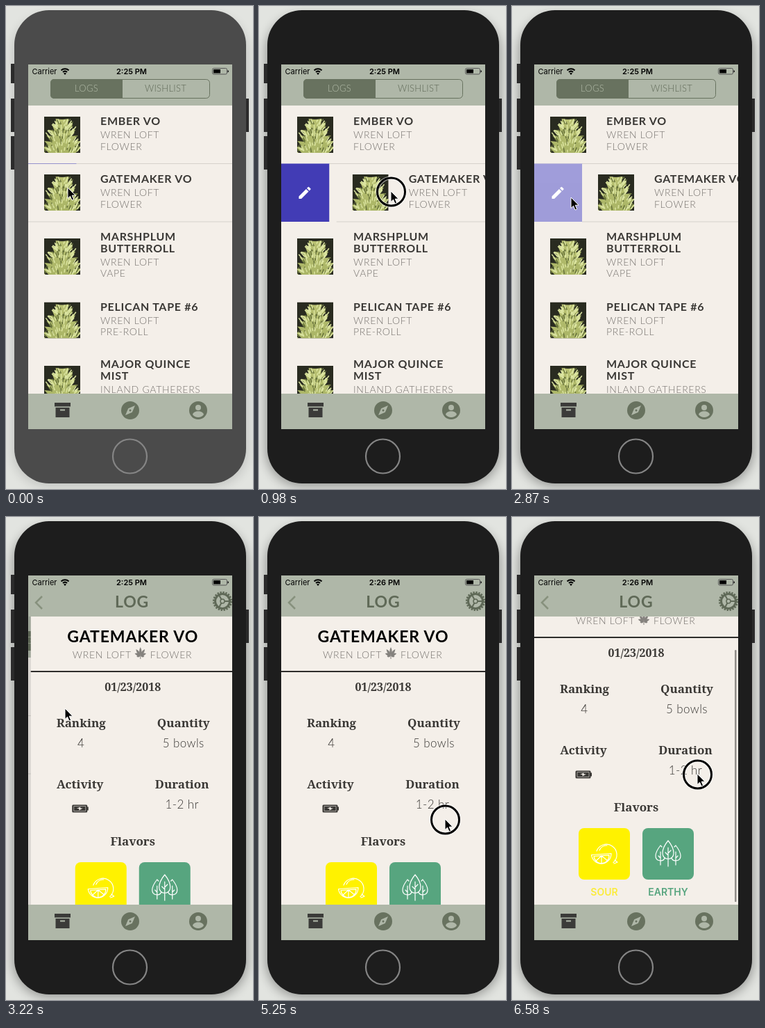
An HTML page that plays this animation: 356x694 px, repeating every 6650 ms.

```html
<!DOCTYPE html>
<html lang="en">
<head>
<meta charset="utf-8">
<title>Log app demo</title>
<style>
html, body { margin: 0; width: 100%; height: 100%; overflow: hidden; background: #e2e4e0; }
svg { display: block; width: 100vw; height: 100vh; }
text { font-family: Lato, "Open Sans", sans-serif; white-space: pre; }
.title { font-size: 16px; font-weight: 700; letter-spacing: .7px; fill: #3a3835; }
.sub { font-size: 14px; font-weight: 300; letter-spacing: .7px; fill: #77736f; }
.seg { font-size: 13px; font-weight: 300; letter-spacing: .3px; }
.big { font-size: 23px; font-weight: 700; letter-spacing: .9px; }
.head { font: 600 17px "Noto Serif", serif; fill: #3a3835; }
.val { font-size: 17px; font-weight: 300; letter-spacing: .4px; fill: #3a3835; }
.bar, .flavor { font-family: Inter, Roboto, sans-serif; }
.bar { font-size: 11px; }
.flavor { font-size: 14px; font-weight: 600; }
.mid { text-anchor: middle; }
.line { fill: none; stroke: #fff; stroke-width: 1.2; stroke-linecap: round; stroke-linejoin: round; }
</style>
</head>
<body>
<svg viewBox="0 0 356 694" preserveAspectRatio="none">
<defs>
  <clipPath id="screen"><path d="M32 84H326V608H32Z"/></clipPath>
  <clipPath id="thumbBox"><path d="M0 0H52V52H0Z"/></clipPath>
  <filter id="blur" x="-20%" y="-20%" width="140%" height="140%"><feGaussianBlur stdDeviation="8"/></filter>
  <linearGradient id="budTone" x2="0" y2="1">
    <stop offset="0" stop-color="#b9c172"/><stop offset="1" stop-color="#a9b465"/>
  </linearGradient>
  <g id="thumb" clip-path="url(#thumbBox)"></g>
</defs>

<rect width="356" height="694" fill="#e2e4e0"/>
<rect id="shadow" x="10" y="14" width="338" height="676" rx="52" filter="url(#blur)"/>
<path d="M7 83h6v28H7zM7 133h6v48H7zM7 187h6v48H7zM345 133h5v48h-5z" fill="#2b2b2b"/>
<rect id="body" x="12" y="6" width="334" height="680" rx="50"/>
<circle cx="178.500" cy="647" r="24.500" fill="none" stroke="#858585" stroke-width="2.200"/>

<g clip-path="url(#screen)">
  <path d="M32 84H326V608H32Z" fill="#f4efe9"/>

  <g id="list">
    <g id="rows"></g>
    <path d="M32 84H326V143H32Z" fill="#afb7a8"/>
    <path d="M168 105H69a5 5 0 0 0-5 5V128a5 5 0 0 0 5 5H168Z" fill="#68725f"/>
    <rect x="64.500" y="105.500" width="229" height="27" rx="5" fill="none" stroke="#68725f"/>
    <text class="seg mid" x="116" y="123" fill="#b3bca9">LOGS</text>
    <text class="seg mid" x="230" y="123" fill="#5f6957">WISHLIST</text>
  </g>

  <g id="detail">
    <path d="M29 143h3V557h-3z" opacity=".12"/>
    <path d="M32 143H326V557H32Z" fill="#f4efe9"/>
    <g id="page">
      <text class="big mid" x="179" y="180">GATEMAKER VO</text>
      <text class="sub" x="92" y="203">WREN LOFT</text>
      <g id="leaf" fill="#85827e" transform="translate(190 199)"></g>
      <text class="sub" x="204" y="203">FLOWER</text>
      <path d="M32 221H326v2H32z" fill="#2e2d2b"/>
      <text class="head mid" x="179" y="250" style="font-size:16px">01/23/2018</text>
      <g id="facts"></g>
      <path d="M93 413.500h19q1.500 0 1.500 1.500v1.500h1.500v5h-1.500V423q0 1.500-1.500 1.500H93q-1.500 0-1.500-1.500v-8q0-1.500 1.500-1.500z" fill="#3a3835"/>
      <path d="M94 415.500h17v7H94z" fill="none" stroke="#cfcac4" stroke-width=".7"/>
      <path d="M98 419l5.500-2.500v2h3.500l-5.500 3v-2.500z" fill="#f4efe9"/>
      <text class="head mid" x="179" y="472">Flavors</text>
      <rect x="96" y="496" width="74" height="74" rx="8" fill="#fff200"/>
      <rect x="188" y="496" width="74" height="74" rx="8" fill="#57a57f"/>
      <g class="line">
        <path d="M122 529A15 15 0 1 1 146 545.500M126 528A11 11 0 0 1 137 521M148 542l4 3-5 2"/>
        <path d="M114.500 534.500L143 532.500A14.300 14.300 0 0 1 114.500 534.500ZM118 536.500l22-1.600A11 11 0 0 1 118 536.500ZM129 535.700v10.500M129 535.700l-7.500 7M129 535.700l8 6.500"/>
        <path d="M225 514c-5 6-8 12-8 18 0 11 16 11 16 0 0-6-3-12-8-18zM225 524V551M225 535l-4-4M225 532l4-4"/>
        <path d="M216 523l-2-2c-4 5-7 10-7 15 0 8 11 9 13 3M214 530V549M214 539l-3-3M234 523l2-2c4 5 7 10 7 15 0 8-11 9-13 3M236 530V549M236 539l3-3"/>
      </g>
      <text class="flavor mid" x="133" y="593" fill="#fbec3a">SOUR</text>
      <text class="flavor mid" x="225" y="593" fill="#57a57f">EARTHY</text>
    </g>
    <rect id="scrollbar" x="321" width="2.500" height="362" rx="1.200" fill="#8f8c88"/>
  </g>

  <g id="header">
    <path d="M32 84H326V143H32Z" fill="#afb7a8"/>
    <g id="nav">
      <path d="M52 114L43 123 52 132" fill="none" stroke="#87917d" stroke-width="2.500"/>
      <g transform="translate(312 121)" fill="none" stroke="#5f6957">
        <circle r="10.500" stroke-width="3"/>
        <circle r="12.800" stroke-width="2.600" stroke-dasharray="2.350 1.671"/>
        <circle r="3" stroke-width="1.500"/>
        <path d="M3 0H10M-1.500 2.600L-5 8.700M-1.500-2.600L-5-8.700" stroke-width="2"/>
      </g>
      <text id="navTitle" class="big mid" x="179" y="130" fill="#5f6957">LOG</text>
    </g>
  </g>

  <text class="bar" x="37.500" y="98">Carrier</text>
  <path d="M79.500 92.500a8 8 0 0 1 11 0M82 95a4.500 4.500 0 0 1 6 0" fill="none" stroke="#000" stroke-width="2"/>
  <path d="M85 99l-2-2.200a3 3 0 0 1 4 0z"/>
  <text id="clock" class="bar mid" x="181" y="98" font-weight="600"></text>
  <rect x="297.500" y="89.500" width="21" height="8.500" rx="2" fill="none" stroke="#555"/>
  <path d="M299 91h10v5.500h-10zM319.500 92.200q1.500 0 1.500 1.600t-1.500 1.600z"/>

  <path d="M32 557H326V608H32Z" fill="#afb7a8"/>
  <path d="M70 570h23v5.500H70zM71.500 577h20v14h-20z" fill="#3b3b39"/>
  <path d="M78 579.500h7v2h-7z" fill="#afb7a8"/>
  <g fill="#68725f"><circle cx="179" cy="581" r="13"/><circle cx="277" cy="581" r="13"/></g>
  <g fill="#afb7a8">
    <path d="M186 574l-4.200 9.800-9.800 4.200 4.200-9.800z"/>
    <circle cx="277" cy="577" r="4"/>
    <path d="M269 587c1-6.500 15-6.500 16 0a10 10 0 0 1-16 0z"/>
  </g>
  <circle cx="179" cy="581" r="1.500" fill="#68725f"/>
</g>

<g id="pointer">
  <g id="ring" fill="none" transform="translate(.5 1)">
    <circle r="20" stroke="#fff" stroke-width="5" opacity=".6"/>
    <circle r="20" stroke="#000" stroke-width="3"/>
  </g>
  <path d="M0 0V15.500L3.500 12.200 6 18 8.600 16.900 6.200 11.200H11Z" stroke="#fff"/>
</g>
</svg>

<script>
const LOOP = 6650, PUSH = 2890, RELEASE = 1120, OPEN = 69;
const $ = id => document.getElementById(id);
const set = (id, name, value) => $(id).setAttribute(name, value);
const move = (id, x, y) => set(id, 'transform', `translate(${x} ${y})`);
const clamp = x => Math.max(0, Math.min(1, x));
const mix = (a, b, k) => a + (b - a) * k;
const smooth = x => x * x * (3 - 2 * x);

// Photo stand-in: a jagged, leafy green cone on a dark ground
function drawThumb() {
  let seed = 7;
  const rand = () => (seed = seed * 16807 % 2147483647) / 2147483647;
  const left = [], right = [];
  for (let i = 0; i <= 12; i++) {
    const y = 4 + i * 4, w = (3 + 23 * (i / 12) ** .6) * (i % 2 ? 1.15 : .75);
    left.push(`${(26 - w).toFixed(1)} ${y - i % 2 * 5}`);
    right.unshift(`${(26 + w).toFixed(1)} ${y - i % 2 * 5}`);
  }
  const blades = n => {
    let d = '';
    for (let i = 0; i < n; i++) {
      const y = 8 + 46 * rand(), side = 2 * rand() - 1, x = 26 + side * (5 + y * .42);
      d += `M${x.toFixed(1)} ${y.toFixed(1)}l${(side * 6).toFixed(1)} ${(-3 - 5 * rand()).toFixed(1)}`;
    }
    return d;
  };
  $('thumb').innerHTML = `<path d="M0 0H52V52H0Z" fill="#292b20"/>
    <path d="${left.concat(right).join('L').replace(/^/, 'M')}Z" fill="url(#budTone)"/>
    <path d="${blades(35)}" stroke="#66713b" stroke-width="1.500"/>
    <path d="${blades(75)}" stroke="#dbe4a0" stroke-width="1.500"/>`;
}

const line = (cls, x, y, s) => `<text class="${cls}" x="${x}" y="${y}">${s}</text>`;

function row(thumbY, titles, subs) {
  let y = thumbY + (titles.length > 1 ? 3 : 12);
  const text = titles.map((s, i) => line('title', 136, y + 16.500 * i, s));
  y += 16.500 * (titles.length - 1) + 19;
  text.push(...subs.map((s, i) => line('sub', 136, y + 16.500 * i, s)));
  return `<use href="#thumb" transform="translate(55 ${thumbY})"/>` + text.join('');
}

function drawRows() {
  const shop = 'WREN LOFT', rule = y => `<path d="M32 ${y}H326v1H32z" fill="#d6d2cb"/>`;
  const button = 'd="M32 226.500H101.500V310H32Z"';
  $('rows').innerHTML =
    '<path d="M32 143H326V557H32Z" fill="#f4efe9"/>' +
    row(159, ['EMBER VO'], [shop, 'FLOWER']) + rule(226) +
    `<path ${button} fill="#fff"/>
    <g id="edit"><path ${button} fill="#423cb5"/>
      <path transform="translate(54.600 257) scale(.95)" fill="#fff" d="M3 17.250V21h3.750L17.810 9.940l-3.750-3.750zM20.710 7.040a1 1 0 0 0 0-1.410l-2.340-2.340a1 1 0 0 0-1.410 0l-1.830 1.830 3.750 3.750z"/></g>
    <path d="M101.500 227H326V310H101.500Z" fill="#f4efe9"/>
    <g id="swipe"><path id="cover" d="M32 227H326V310H32Z" fill="#f4efe9"/>` +
    row(242, ['GATEMAKER VO'], [shop, 'FLOWER']) + rule(309.500) + '</g>' +
    row(334, ['MARSHPLUM', 'BUTTERROLL'], [shop, 'VAPE']) +
    row(425.500, ['PELICAN TAPE #6'], [shop, 'PRE-ROLL']) +
    row(517, ['MAJOR QUINCE', 'MIST'], ['INLAND GATHERERS']);
}

function drawDetail() {
  const blades = [-105, -70, -35, 0, 35, 70, 105].map(a => {
    const n = 7 + 5 * Math.cos(a * Math.PI / 180);
    return `<path transform="rotate(${a})" d="M0 0Q-3.400 ${-n / 2} 0 ${-n}Q3.400 ${-n / 2} 0 0"/>`;
  });
  $('leaf').innerHTML = blades.join('') + '<path d="M-.5 0h1v5h-1z"/>';
  $('facts').innerHTML = [
    ['Ranking', '4', 104.500, 302], ['Quantity', '5 bowls', 252, 302],
    ['Activity', '', 103, 390], ['Duration', '1-2 hr', 250, 390]
  ].map(([head, val, x, y]) => line('head mid', x, y, head) + line('val mid', x, y + 29, val)).join('');
}

// Eased keyframes: [time, x, y]
const path = [
  [350, 89, 261], [910, 190, 266], [1190, 190, 266], [1800, 85, 275], [3680, 85, 275],
  [4340, 251, 372], [4830, 253, 405], [5130, 268, 434], [5290, 268, 434],
  [5950, 267, 378], [6440, 267, 369]
];
function pointerAt(t) {
  const i = path.findIndex(k => k[0] > t);
  if (i < 0) return path[path.length - 1].slice(1);
  if (!i) return path[0].slice(1);
  const a = path[i - 1], b = path[i], k = smooth((t - a[0]) / (b[0] - a[0]));
  return [mix(a[1], b[1], k), mix(a[2], b[2], k)];
}

// Cubic bezier easing solved by bisection
function slide(x) {
  if (x <= 0 || x >= 1) return clamp(x);
  const curve = (s, a, b) => 3 * (1 - s) * s * ((1 - s) * a + s * b) + s ** 3;
  let lo = 0, hi = 1;
  for (let i = 0; i < 20; i++) {
    const s = (lo + hi) / 2;
    if (curve(s, .2833, .31833) < x) lo = s; else hi = s;
  }
  return curve(lo, .99, .99);
}

function swipeAt(t, x) {
  if (t >= RELEASE) return OPEN + 10.700 * (1 - clamp((t - RELEASE) / 300)) ** 3;
  const d = x - 89;
  return d < OPEN ? d : OPEN + (d - OPEN) / 3;
}

const presses = [[280, RELEASE], [2590, 2780], [5180, LOOP]];

function draw(t) {
  const [x, y] = pointerAt(t), awake = t >= 70;
  set('body', 'fill', awake ? '#1d1d1d' : '#4b4b4b');
  set('shadow', 'opacity', awake ? .35 : .15);
  move('pointer', x, y);
  set('ring', 'opacity', Math.max(...presses.map(([a, b]) =>
    Math.min(clamp((t - a) / 60), clamp((b - t) / 60 + 1)))));

  move('swipe', swipeAt(t, x), 0);
  set('edit', 'opacity', mix(1, .5, clamp((t - 2680) / 150)));

  const pushed = t >= PUSH, p = slide((t - PUSH) / 500);
  move('list', -88 * p, pushed ? 59 : 0);
  move('detail', 294 * (1 - p), 0);
  set('detail', 'visibility', pushed ? 'visible' : 'hidden');
  set('header', 'visibility', pushed ? 'visible' : 'hidden');
  set('nav', 'opacity', p);
  move('navTitle', 200 * (1 - p), 0);
  $('clock').textContent = t < 4000 ? '2:25 PM' : '2:26 PM';

  const scroll = t > 5290 ? 49 * (434 - y) / 65 : 0;
  move('page', 0, -scroll);
  set('scrollbar', 'y', 148 + scroll * .88);
  set('scrollbar', 'opacity', clamp(scroll / 6));
}

drawThumb();
drawRows();
drawDetail();
const start = performance.now();
function tick() {
  draw((performance.now() - start) % LOOP);
  requestAnimationFrame(tick);
}
tick();
</script>
</body>
</html>
```
